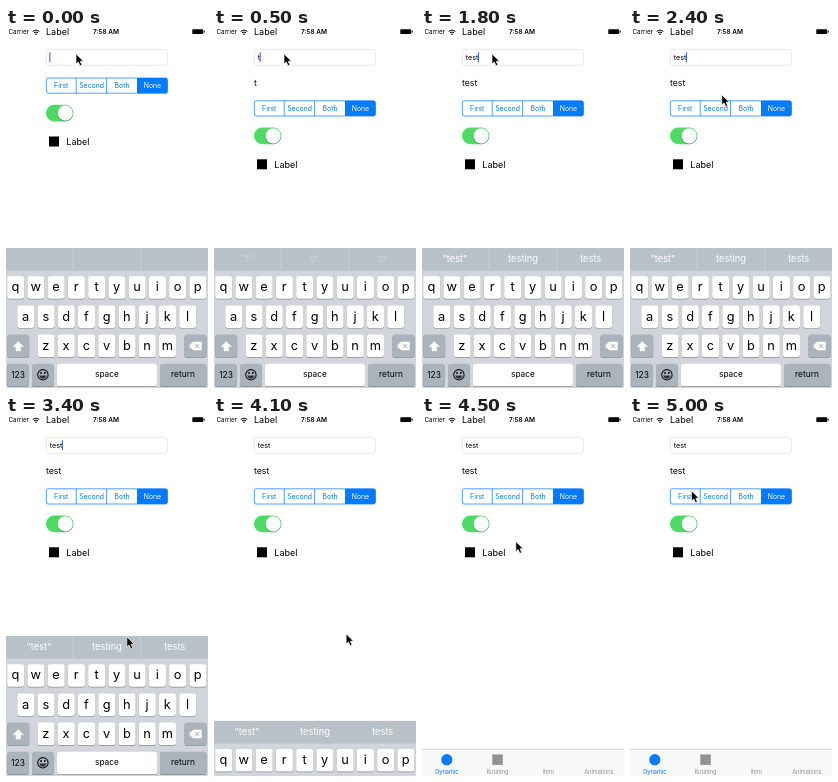
Animation of 202x360 px, one loop 5.1 s. Source, as an HTML page:

```html
<!DOCTYPE html>
<html lang="en">
<head>
<meta charset="utf-8">
<title>Form demo</title>
<style>
  html, body { margin: 0; width: 100%; height: 100%; overflow: hidden; background: #fff; }
  svg { display: block; width: 202px; height: 360px; font-family: Inter, Roboto, sans-serif; }
</style>
</head>
<body>
<svg id="stage" viewBox="0 0 202 360"></svg>
<script>
const BLUE = '#007aff', LOOP = 5100, STEP = 100;

const text = (x, y, s, size, extra = '') =>
  `<text x="${x}" y="${y}" font-size="${size}" ${extra}>${s}</text>`;
const mid = (x, y, s, size, extra = '') => text(x, y, s, size, `text-anchor="middle" ${extra}`);
const rect = (x, y, w, h, fill, extra = '') =>
  `<rect x="${x}" y="${y}" width="${w}" height="${h}" fill="${fill}" ${extra}/>`;
const key = (x, y, w, fill = '#fff') =>
  rect(x, y + 0.7, w, 22.5, '#898c91', 'rx="2.6"') + rect(x, y, w, 22.5, fill, 'rx="2.6"');

function statusBar() {
  return text(2.5, 6.3, 'Carrier', 6.3) +
    `<g fill="none" stroke="#000" stroke-width="1">
      <path d="M26.7 3.4Q30 .6 33.3 3.4M28 4.9Q30 3.2 32 4.9"/></g>
     <circle cx="30" cy="6.2" r=".8"/>` +
    text(40, 7, 'Label', 9) +
    mid(100, 6.3, '7:58 AM', 6.5, 'font-weight="600"') +
    rect(186.3, 1.2, 11, 4.8, '#000', 'rx=".8"') + rect(197.8, 2.7, 1, 1.8, '#000');
}

function form() {
  const segments = ['First', 'Second', 'Both', 'None'].map((s, i) =>
    mid(55.2 + i * 30.4, 59.9, s, 6.9, `fill="${i == 3 ? '#fff' : BLUE}"`)).join('');
  return rect(40.3, 21.3, 121.2, 16, '#fff', 'rx="2.7" stroke="#dcdcdc" stroke-width=".6"') +
    text(43.7, 31.8, '', 7.2, 'id="typed"') + rect(0, 24.3, 1.1, 9.8, '#4268e8', 'id="caret"') +
    text(40, 58.2, '', 8.7, 'id="echo"') +
    `<g id="controls">
      ${rect(40.3, 50, 121.2, 15.2, '#fff', `rx="2" stroke="${BLUE}" stroke-width=".7"`)}
      <path d="M131 50h28.5a2 2 0 0 1 2 2v11.2a2 2 0 0 1-2 2H131z" fill="${BLUE}"/>
      <path d="M70.2 50v15.2M100.6 50v15.2" stroke="${BLUE}" stroke-width=".7"/>
      ${segments}
      ${rect(40, 76.7, 27.5, 16.7, '#4cd964', 'rx="8.35"')}
      <circle cx="59.2" cy="85.7" r="7.9" opacity=".22"/>
      <circle cx="59.2" cy="85" r="7.6" fill="#fff"/>
      ${rect(43, 108.5, 10, 10, '#000')}
      ${text(60.3, 116.8, 'Label', 9)}
    </g>`;
}

function tabBar() {
  const names = ['Dynamic', 'Rotating', 'Item', 'Animations'];
  return rect(0, 333, 202, 27, '#f8f8f8') + rect(0, 332.8, 202, 0.6, '#b8b8b8') +
    `<circle cx="24.8" cy="343.7" r="5.6" fill="${BLUE}"/>` + rect(70.3, 338.4, 10.5, 10.5, '#929292') +
    names.map((s, i) => mid(24.8 + i * 50.7, 358.2, s, 5.6, `fill="${i ? '#929292' : BLUE}"`)).join('');
}

function keyboard() {
  const gray = '#abb3bd';
  const rowY = i => 248.2 + i * 29.2;
  const letters = ['qwertyuiop', 'asdfghjkl', 'zxcvbnm'].map((row, r) =>
    [...row].map((c, i) => {
      const x = 100.8 + (i - (row.length - 1) / 2) * 20.25;
      return key(x - 8.5, rowY(r), 17) + mid(x - 0.2, rowY(r) + 15.1, c, 12.8);
    }).join('')).join('');
  const y3 = rowY(2), y4 = rowY(3);
  return rect(0, 220, 202, 140, '#d1d5db') + rect(0, 220, 202, 22.7, '#b8c0c8') +
    '<path id="dividers" d="M67 220.5v22M134.7 220.5v22" stroke="#d3d8dd" stroke-width=".7"/>' +
    '<g id="hints" fill="#fff">' + [33, 101, 168.7].map(x => mid(x, 234.2, '', 9.3)).join('') + '</g>' +
    letters +
    key(1.2, y3, 22, gray) + key(178.5, y3, 22, gray) +
    key(1.2, y4, 21.5, gray) + key(26, y4, 21.8, gray) + key(51, y4, 100) + key(154, y4, 46.5, gray) +
    `<path d="M12.3 313.4l5.3 5.4h-3v4.3H10v-4.3H7z" fill="#fff" stroke="#e8ebee" stroke-width=".6"/>
     <path d="M183 318l4-4.2h8.6v8.4H187z" fill="#fff"/>
     <path d="M189.2 316l4 4m0-4l-4 4" stroke="${gray}" stroke-width="1"/>
     <circle cx="36.9" cy="346.8" r="5.2" fill="none" stroke="#111" stroke-width="1.1"/>
     <path d="M33.4 347.6h7q-.8 3.2-3.5 3.2t-3.5-3.2z" fill="#333"/>
     <circle cx="35" cy="345" r=".9"/><circle cx="38.8" cy="345" r=".9"/>` +
    mid(12, 349.8, '123', 8.4) + mid(101, 349.2, 'space', 8.4) + mid(177, 349.2, 'return', 8.4);
}

const stage = document.getElementById('stage');
stage.innerHTML = statusBar() + form() + tabBar() + `<g id="keyboard">${keyboard()}</g>` +
  `<path id="pointer" d="M0 0V10.2L2.3 8.1 4 11.9 5.9 11.1 4.3 7.4H7.4z"
    stroke="#fff" stroke-width=".7"/>`;
const $ = id => document.getElementById(id);

const typing = [
  [0, '', ['', '', '']],
  [400, 't', ['"t"', 'th', 'to']],
  [600, 'te', ['"te"', 'the', 'ten']],
  [900, 'tes', ['"tes"', 'test', 'testing']],
  [1400, 'test', ['"test"', 'testing', 'tests']],
];
const pointerPath = [
  [0, 70, 25.8], [1900, 70, 25.8], [2400, 91.8, 66.8], [3400, 120.8, 220.8],
  [3800, 170, 342], [3900, 170, 342], [4200, 113.2, 155.8], [5000, 61.5, 74.8], [LOOP, 61.5, 74.8],
];
const CLOSE = 3950;

function pointerAt(t) {
  const i = pointerPath.findIndex(p => p[0] > t);
  const [t0, x0, y0] = pointerPath[i - 1], [t1, x1, y1] = pointerPath[i];
  const k = (t - t0) / (t1 - t0);
  return [x0 + (x1 - x0) * k, y0 + (y1 - y0) * k];
}

function keyboardOffset(t) {
  const k = Math.min(1, Math.max(0, (t - CLOSE) / 450));
  return 140 * (1 - (1 - k) ** 2.3);
}

function draw(t) {
  const [since, value, hints] = typing.filter(e => e[0] <= t).pop();
  const closing = t > CLOSE;
  $('typed').textContent = $('echo').textContent = value;
  [...$('hints').children].forEach((el, i) => el.textContent = hints[i]);
  $('hints').setAttribute('opacity', Math.min(1, (t - since) / 300));
  $('controls').setAttribute('transform', `translate(0 ${value ? 22.8 : 0})`);

  const blinkOff = t > 1800 && (t + 150) % 1000 < 300;
  $('caret').setAttribute('x', 43.3 + (value ? $('typed').getComputedTextLength() : 0));
  $('caret').setAttribute('opacity', blinkOff || closing ? 0 : 1);

  $('dividers').setAttribute('opacity', closing ? 0 : 1);
  $('keyboard').setAttribute('transform', `translate(0 ${keyboardOffset(t)})`);
  $('pointer').setAttribute('transform', `translate(${pointerAt(t)})`);
}

function tick() {
  const t = performance.now() % LOOP;
  draw(Math.floor(t / STEP) * STEP);
  requestAnimationFrame(tick);
}
tick();
</script>
</body>
</html>
```
